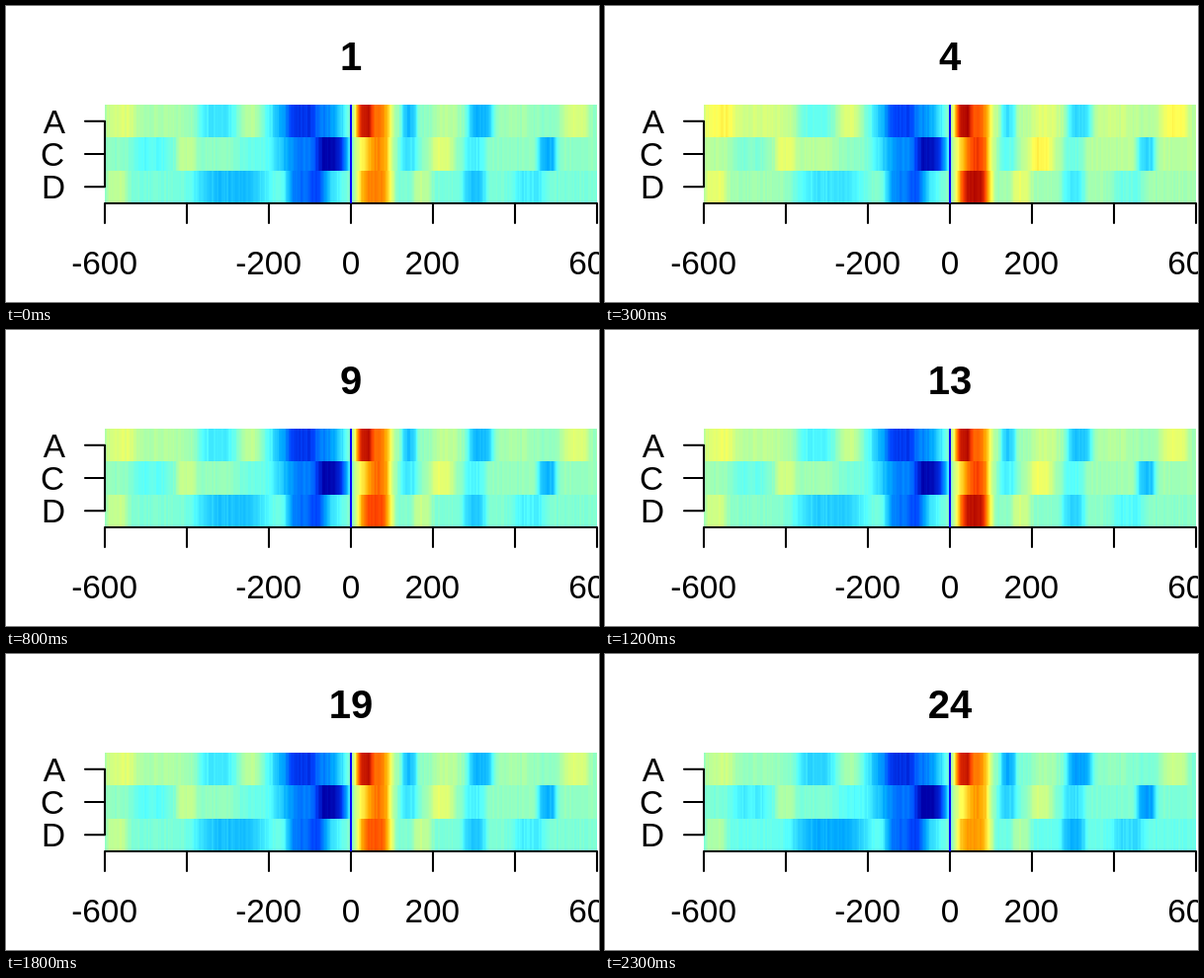
Animation, 600 px wide and 300 px high, one loop 2.4 s. Source, as an HTML page with a canvas:

```html
<!DOCTYPE html>
<html>
<head>
<meta charset="utf-8">
<style>
html, body { margin: 0; width: 100%; height: 100%; overflow: hidden; background: #fff; }
canvas, svg { position: absolute; left: 0; top: 0; }
text { font: 33.33px "Liberation Sans", Arial, sans-serif; text-anchor: middle; }
#title { font-size: 40px; font-weight: bold; }
.row { text-anchor: end; }
path { fill: none; stroke: #000; stroke-width: 2.083; stroke-linecap: round; stroke-linejoin: round; }
.zero { stroke: #00f; stroke-linecap: butt; }
</style>
</head>
<body>
<canvas id="map" width="600" height="300"></canvas>
<svg width="600" height="300">
  <path d="M100 200H598M100 200v20M183 200v20M266 200v20M349 200v20M432 200v20M515 200v20M598 200v20"/>
  <path d="M100 116.7V183.3M100 116.7H80M100 150H80M100 183.3H80"/>
  <path class="zero" d="M349 100V200"/>
  <text id="title" x="349" y="65">1</text>
  <text class="row" x="60" y="129">A</text>
  <text class="row" x="59" y="162">C</text>
  <text class="row" x="60" y="195">D</text>
  <text x="99.6" y="272">-600</text>
  <text x="265.6" y="272">-200</text>
  <text x="349" y="272">0</text>
  <text x="431.3" y="272">200</text>
  <text x="597" y="272">600</text>
</svg>
<script>
const ctx = document.getElementById('map').getContext('2d');
const title = document.getElementById('title');

// Each row is a resting level plus flat-topped bumps: centre, half width, height.
const rows = [
  { top: 100, bottom: 133, rest: .46, gain: 0, bumps: [
    [115, 16, .08], [150, 46, .04], [213, 20, -.12], [247, 10, .06],
    [305, 38, -.27], [300, 14, -.1], [371, 19, .36], [363, 8, .15],
    [408, 8, -.18], [445, 14, .06], [480, 13, -.2], [515, 18, .03], [576, 14, .11]] },
  { top: 133, bottom: 167, rest: .46, gain: .45, bumps: [
    [147, 22, -.08], [183, 10, .07], [255, 22, -.06],
    [310, 36, -.27], [330, 16, -.2], [371, 19, .2], [378, 11, .13],
    [408, 10, -.12], [441, 12, .12], [475, 12, -.1], [548, 10, -.2]] },
  { top: 167, bottom: 200, rest: .43, gain: 1, bumps: [
    [112, 12, .1], [228, 38, -.15], [303, 20, -.26], [325, 15, -.1],
    [373, 18, .37], [421, 10, .1], [474, 12, -.14], [530, 17, -.08]] }
];

// Brief swings: step, change of the background, change of the red band.
const swings = [[4, .06, .15], [6, -.025, -.02], [9, .01, .07], [13, .025, .16], [19, .005, .05], [24, -.025, -.02]];

const palette = ['00a', '04f', '0af', '5ff', 'afa', 'ff5', 'fa0', 'f40', 'a00']
  .map(hex => [...hex].map(digit => parseInt(digit, 16) * 17));

const clamp = v => Math.max(0, Math.min(1, v));
const bump = (x, centre, half) => Math.exp(-(((x - centre) / half) ** 4));

function noise(n) {
  const s = Math.sin(n * 12.9898) * 43758.5453;
  return s - Math.floor(s) - .5;
}

function swing(step, part) {
  return swings.reduce((sum, s) => sum + s[part] * Math.exp(-((step - s[0]) ** 2)), 0);
}

function color(v) {
  const p = clamp(v) * (palette.length - 1);
  const i = Math.min(Math.floor(p), palette.length - 2);
  return `rgb(${palette[i].map((c, k) => Math.round(c + (palette[i + 1][k] - c) * (p - i)))})`;
}

function draw(step) {
  title.textContent = step;
  const background = swing(step, 1), heat = swing(step, 2);
  rows.forEach((row, r) => {
    for (let x = 100; x < 598; x++) {
      const grain = noise(Math.floor((x - 100) / 1.66) + r * 400) * .03;
      const drift = background * (1 - .65 * bump(x, 330, 60)) + heat * row.gain * bump(x, 373, 14);
      const level = row.bumps.reduce((sum, [c, w, h]) => sum + h * bump(x + .5, c, w), row.rest);
      ctx.fillStyle = color(level + grain + drift);
      ctx.fillRect(x, row.top, 1, row.bottom - row.top);
    }
  });
}

let shown = 0;
function tick() {
  const step = Math.floor(performance.now() % 2400 / 100) + 1;
  if (step !== shown) draw(shown = step);
  requestAnimationFrame(tick);
}
tick();
</script>
</body>
</html>
```
